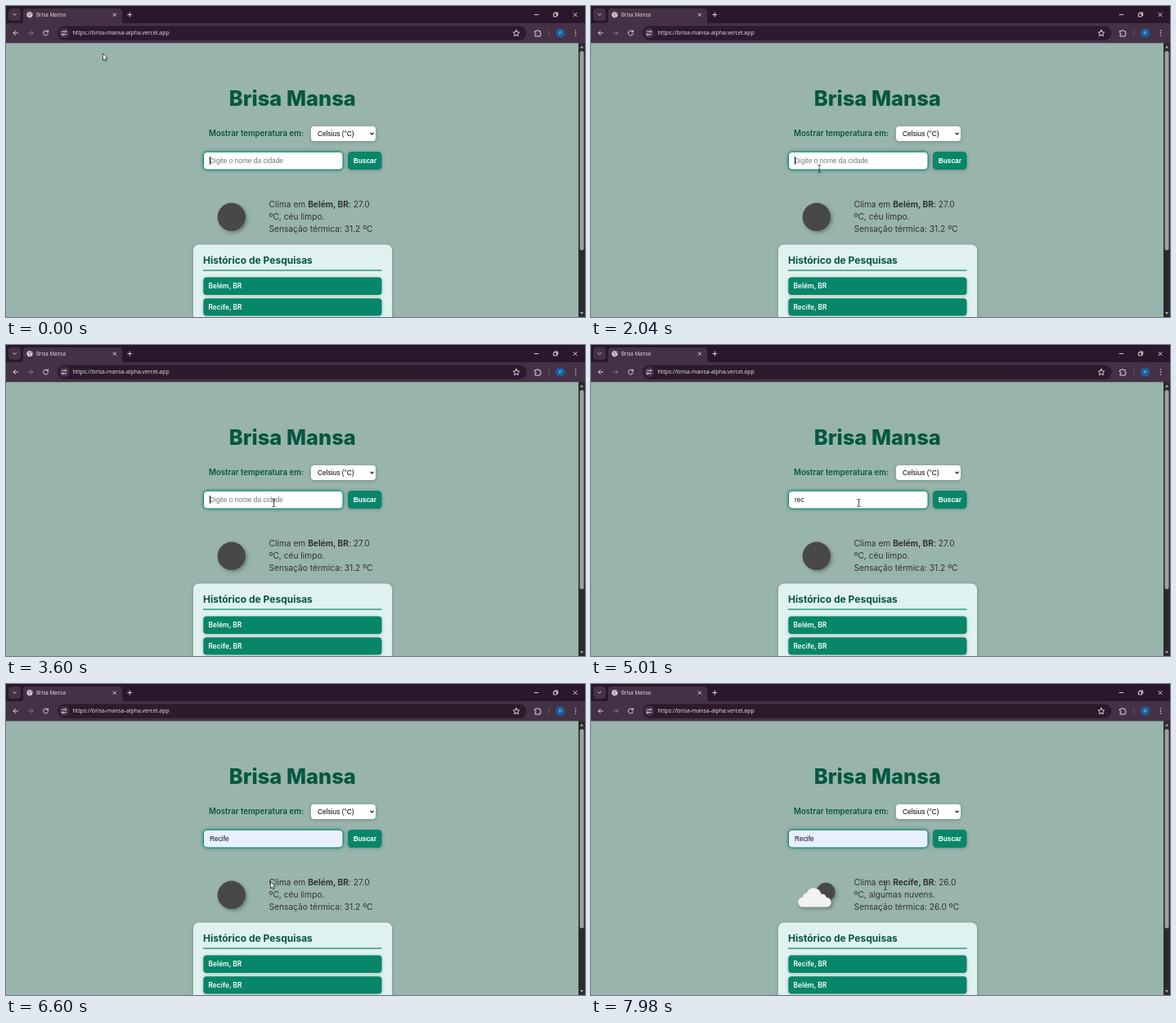
These frames come from a looping animation (708x380 px, 8000 ms). An HTML page:

```html
<!DOCTYPE html>
<html lang="pt-BR">
<head>
<meta charset="utf-8">
<title>Brisa Mansa</title>
<style>
html, body { margin: 0; width: 100%; height: 100%; overflow: hidden; background: #98b4ad; }
svg { display: block; width: 100vw; height: 100vh; }
text { white-space: pre; font-family: Inter, "Open Sans", sans-serif; }
.ui { font-family: "Open Sans", "Noto Sans", sans-serif; fill: #e9e2ea; }
.field { font-family: "Liberation Sans", Arial, sans-serif; font-size: 8.35px; }
.line { fill: none; stroke: #ddd3de; stroke-width: 1; stroke-linecap: round; stroke-linejoin: round; }
.dark { fill: #04573f; }
.body { fill: #333; font-size: 10.2px; }
.strong { font-weight: 700; }
.soft { filter: drop-shadow(0 1.5px 2px rgba(0, 0, 0, .22)); }
.glow { filter: drop-shadow(0 0 2px rgba(6, 120, 94, .75)); }
.icon { filter: drop-shadow(2px 2.5px 2px rgba(0, 0, 0, .3)); }
</style>
</head>
<body>
<svg viewBox="0 0 708 380" preserveAspectRatio="none">
  <rect width="708" height="380" fill="#98b4ad"/>

  <g id="header">
    <text class="dark" x="350.3" y="122" font-size="25.5" font-weight="800" text-anchor="middle">Brisa Mansa</text>
    <text class="dark" x="248" y="159" font-size="9.65" font-weight="600">Mostrar temperatura em:</text>
    <rect class="soft" x="373" y="147" width="79" height="18" rx="4" fill="#fff"/>
    <text class="field" x="381" y="158.8">Celsius (°C)</text>
    <path d="M445.6 154.8l2 2.1 2-2.1" fill="none" stroke="#111" stroke-width="1.2"/>
    <rect id="input" class="glow" x="241.5" y="178.2" width="170.5" height="21.8" rx="4.5" stroke="#0b8467"/>
    <text id="typed" class="field" x="249" y="191.7"></text>
    <rect id="caret" y="184" width="1" height="9.6" fill="#111"/>
    <rect class="soft" x="418" y="178" width="41.5" height="22" rx="4.5" fill="#078669"/>
    <text class="field strong" x="438.8" y="191.7" fill="#fff" text-anchor="middle">Buscar</text>
  </g>

  <g id="weather">
    <circle id="moon" class="icon" cx="275.8" cy="257.8" r="17.2" fill="#48484a"/>
    <g id="clouds" class="icon">
      <circle cx="287" cy="254.2" r="11.4" fill="#48484a"/>
      <path fill="#f2f2f2" d="M259.5 272.5a6 6 0 0 1-.6-12 5.6 5.6 0 0 1 5-5.6 9.2 9.2 0 0 1 17.4 1.6 5.8 5.8 0 0 1 6.6 4.2 6 6 0 0 1 1.2 11.8z"/>
    </g>
    <text class="body" x="321.5" y="246">Clima em <tspan class="strong" id="city"></tspan><tspan id="temp"></tspan></text>
    <text class="body" x="321.5" y="261.2" id="sky"></text>
    <text class="body" x="321.5" y="276.4" id="feels"></text>
  </g>
  <text class="body" id="loading" x="350" y="257.3" style="font-size:10.6px" text-anchor="middle">Carregando...</text>

  <g id="panel">
    <rect class="soft" x="229" y="291.5" width="243" height="170" rx="7" fill="#dff2ef"/>
    <text class="dark" x="241" y="315" font-size="12" font-weight="700">Histórico de Pesquisas</text>
    <rect x="241" y="322.4" width="218.5" height="1.2" fill="#078669"/>
    <g id="items"></g>
  </g>

  <g id="scrollbar">
    <rect x="700" y="45" width="8" height="335" fill="#2b2b2c"/>
    <rect x="701.6" y="55" width="5" height="243.5" rx="2.5" fill="#9f9f9f"/>
    <path d="M701.8 51.5h4.6l-2.3-3zM701.8 374h4.6l-2.3 3z" fill="#9f9f9f"/>
  </g>

  <g id="browser">
    <rect width="708" height="22" fill="#29182b"/>
    <rect y="21" width="708" height="24.3" fill="#453146"/>
    <rect x="3" y="3" width="15" height="15" rx="4" fill="#453146"/>
    <path class="line" d="M8.7 9.6l1.8 1.8 1.8-1.8"/>
    <path d="M17 21.5q4 0 4-4V7q0-4 4-4h113q4 0 4 4v10.500q0 4 4 4z" fill="#453146"/>
    <circle cx="29" cy="10.6" r="3.6" fill="#d5cdd6"/>
    <path d="M27 8.500q2 .2 1.700 2t1.500 2.500M30 7.500q0 2 2 2" fill="none" stroke="#6a596b" stroke-width=".9"/>
    <text class="ui" x="37" y="12.900" font-size="6.3">Brisa Mansa</text>
    <path class="line" d="M131.100 9l3.400 3.400m0-3.400l-3.400 3.400M148.800 10.600h5m-2.500-2.500v5"/>
    <path class="line" d="M646.200 10.600h4.600M669.800 9.200h3.700v3.700h-3.700zM671 8h3.700v3.700M694 8.500l4.200 4.200m0-4.200l-4.200 4.200"/>
    <path class="line" d="M14.600 33H9m2.500-2.500L9 33l2.500 2.500"/>
    <path class="line" opacity=".4" d="M27.200 33h5.600m-2.500-2.500l2.500 2.500-2.500 2.500"/>
    <path class="line" d="M51.300 31.500a3 3 0 1 0 .3 2.200M51.500 29.900v1.900h-1.900"/>
    <rect x="63" y="24.500" width="573.500" height="17.200" rx="8.600" fill="#2b1b2d"/>
    <circle cx="71.200" cy="33" r="6.200" fill="#453146"/>
    <path class="line" d="M68.600 31.300h2.200M71 34.800h2.700"/>
    <circle class="line" cx="72.700" cy="31.300" r="1"/>
    <circle class="line" cx="69.200" cy="34.800" r="1"/>
    <text class="ui" x="81.500" y="35.400" font-size="6.900">https://brisa-mansa-alpha.vercel.app</text>
    <path class="line" d="M624 29.300l1.150 2.500 2.700.3-2 1.900.550 2.700-2.400-1.350-2.400 1.350.550-2.700-2-1.900 2.700-.3z"/>
    <path class="line" d="M647 30.600h2a1 1 0 0 1 2.200 0h2v2.200a1 1 0 0 1 0 2.200v2h-6.200v-2a1 1 0 0 0 0-2.200z"/>
    <path d="M664 28.500v9" stroke="#66536a"/>
    <circle cx="677.700" cy="33" r="5.700" fill="#17609f"/>
    <text class="ui" x="677.700" y="35.200" font-size="6" text-anchor="middle">P</text>
    <g fill="#ddd3de">
      <circle cx="696.600" cy="30" r=".8"/><circle cx="696.600" cy="33" r=".8"/><circle cx="696.600" cy="36" r=".8"/>
    </g>
  </g>

  <path id="arrow" d="M0 0v8.300l1.900-1.700 1.200 2.900 1.400-.6-1.200-2.800h2.500z" fill="#fff" stroke="#111" stroke-width=".7" stroke-linejoin="round"/>
  <path id="beam" d="M-2-4.500h1.500l.5.500.5-.5H2M0-4v8M-2 4.500h1.500l.5-.5.5.5H2" fill="none" stroke="#222" stroke-width=".8"/>
</svg>
<script>
const LOOP = 8000, STEP = 30;
const LOAD = 6990, RESULT = 7200, PREVIEW = 5430, FILL = 6120;
const $ = id => document.getElementById(id);
const show = (id, on) => $(id).setAttribute('visibility', on ? 'visible' : 'hidden');
const shift = (id, x, y) => $(id).setAttribute('transform', `translate(${x} ${y})`);
const put = (id, s) => { if ($(id).textContent !== s) $(id).textContent = s; };

// pointer keys: time, x, y
const path = [
  [30, 118.5, 58], [690, 231.5, 150], [1800, 231.5, 150], [2550, 429, 352],
  [2580, 429, 352], [3240, 327.5, 193], [5250, 327.5, 193], [5730, 323.5, 241.5],
  [7290, 323.5, 241.5], [7320, 329, 247], [7920, 329, 247], [7980, 360, 247]
];
const typing = [[0, ''], [4110, 'r'], [4350, 're'], [4500, 'rec'], [PREVIEW, 'Recife']];
const caretOn = [[0, 330], [870, 1350], [1880, 2410], [2940, 3630], [4110, 5010], [FILL, 6600], [7130, 7575]];

const before = { city: 'Belém, BR', temp: ': 27.0', sky: 'ºC, céu limpo.', feels: 'Sensação térmica: 31.2 ºC' };
const after = { city: 'Recife, BR', temp: ': 26.0', sky: 'ºC, algumas nuvens.', feels: 'Sensação térmica: 26.0 ºC' };
const oldList = ['Belém, BR', 'Recife, BR', 'Manaus, BR', ''];
const newList = ['Recife, BR', 'Belém, BR', 'Manaus, BR', ''];

$('items').innerHTML = oldList.map((_, i) => {
  const y = 331.6 + i * 25.6;
  return `<rect class="soft" x="241.3" y="${y}" width="218.2" height="21.300" rx="4" fill="#078669"/>
    <text id="item${i}" x="247.5" y="${y + 13.6}" font-size="8.4" font-weight="600" fill="#fff"></text>`;
}).join('');

function pointer(t) {
  const i = path.findIndex(k => k[0] > t);
  if (i === 0) return path[0].slice(1);
  if (i < 0) return path[path.length - 1].slice(1);
  const [t0, x0, y0] = path[i - 1], [t1, x1, y1] = path[i];
  const u = (t - t0) / (t1 - t0), e = u * u * (3 - 2 * u);
  return [x0 + (x1 - x0) * e, y0 + (y1 - y0) * e];
}

function drawField(t) {
  const text = typing.filter(k => k[0] <= t).pop()[1];
  const preview = t >= PREVIEW && t < FILL;
  const typed = $('typed');
  put('typed', text || 'Digite o nome da cidade');
  typed.setAttribute('fill', text ? '#111' : '#757575');
  typed.style.fontSize = preview ? '7px' : '';
  $('input').setAttribute('fill', t >= PREVIEW ? '#e8f0fe' : '#fff');
  $('caret').setAttribute('x', 249 + (text ? typed.getComputedTextLength() : 0));
  show('caret', caretOn.some(([a, b]) => t >= a && t < b));
}

function draw(t) {
  const loading = t >= LOAD && t < RESULT, done = t >= RESULT;
  const info = done ? after : before;
  for (const id in info) put(id, info[id]);
  (done ? newList : oldList).forEach((name, i) => put('item' + i, name));
  shift('header', 0, loading ? 30.2 : 0);
  shift('panel', 0, loading ? -30 : 0);
  $('weather').style.display = loading ? 'none' : '';
  show('loading', loading);
  show('moon', !done);
  show('clouds', done);
  drawField(t);

  const [x, y] = pointer(t);
  const overInput = x > 242 && x < 412 && y > 178 && y < 200;
  const beam = overInput || t >= 7320;
  show('beam', beam);
  show('arrow', !beam);
  shift('beam', x, y);
  shift('arrow', x, y);
}

function tick() {
  const t = performance.now() % LOOP;
  draw(Math.floor(t / STEP) * STEP);
  requestAnimationFrame(tick);
}
tick();
</script>
</body>
</html>
```
